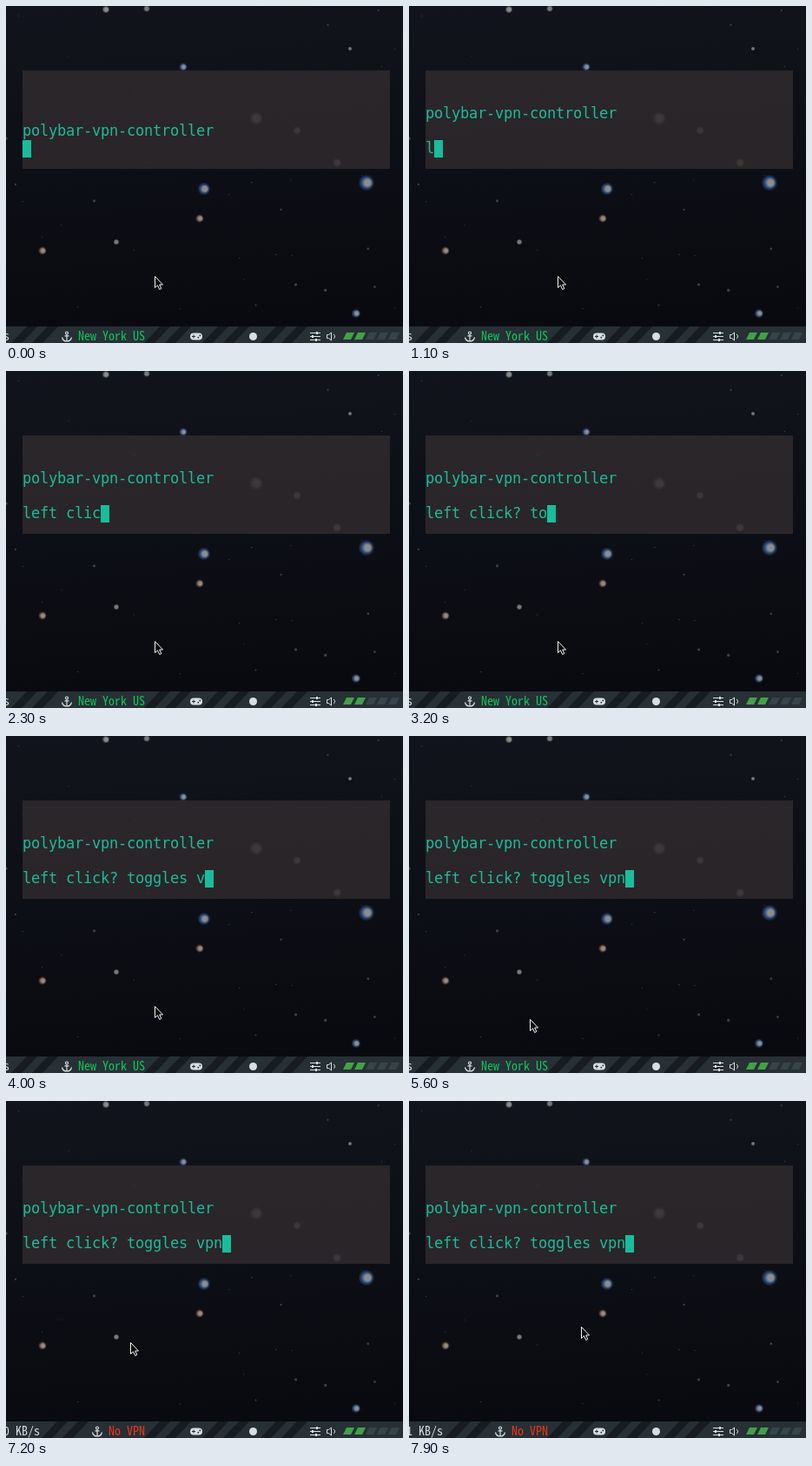
Recreate the animation shown at these times as an HTML page with a canvas. Size 457 by 387 pixels, loop 8 s.

```html
<!DOCTYPE html>
<html lang="en">
<head>
<meta charset="utf-8">
<title>polybar-vpn-controller</title>
<style>
  html, body { margin: 0; width: 100%; height: 100%; overflow: hidden; background: #0c0e14; }
  canvas { display: block; width: 457px; height: 387px; }
</style>
</head>
<body>
<canvas id="stage"></canvas>
<script>
const W = 457, H = 387, LOOP = 8000, TICK = 100;
const TEAL = '#1abc9c', LIGHT = '#d9dee1', BAR = '#263035', GAP = '#161c20';
const CELL = 10, LEFT = 19, BAR_TOP = 368;
const TERM_FONT = '17px "DejaVu Sans Mono", monospace';
const BAR_FONT = '14px "Noto Sans Mono CJK JP", "Noto Sans Mono CJK SC", monospace';

const TITLE = 'polybar-vpn-controller';
const TITLE_UP = 600, TYPE_START = 1100, VPN_OFF = 7000, RATE_UP = 7500;
// One slot per tick; empty slots are pauses.
const KEYS = 'l|e|f|t| ||c|l|i||||c|k||?||| |||to||g|g|le||s ||v|||||p|n'.split('|');

const canvas = document.getElementById('stage');
const dpr = window.devicePixelRatio || 1;
canvas.width = Math.round(W * dpr);
canvas.height = Math.round(H * dpr);
const ctx = canvas.getContext('2d');
ctx.scale(dpr, dpr);
ctx.lineJoin = 'round';

const clamp = v => Math.min(1, Math.max(0, v));
const easeIn = (u, p) => u ** p;
const easeOut = (u, p) => 1 - (1 - u) ** p;
const mix = (a, b, u) => Math.round(a + (b - a) * u);

function seeded(seed) {
  return () => (seed = seed * 16807 % 2147483647) / 2147483647;
}

function rect(x, y, w, h, fill) {
  ctx.fillStyle = fill;
  ctx.fillRect(x, y, w, h);
}

function poly(points, fill) {
  ctx.beginPath();
  points.forEach(([x, y]) => ctx.lineTo(x, y));
  ctx.closePath();
  ctx.fillStyle = fill;
  ctx.fill();
}

function disc(x, y, r, fill) {
  ctx.beginPath();
  ctx.arc(x, y, r, 0, Math.PI * 2);
  ctx.fillStyle = fill;
  ctx.fill();
}

function stroke(width, build) {
  ctx.beginPath();
  build();
  ctx.lineWidth = width;
  ctx.strokeStyle = LIGHT;
  ctx.stroke();
}

function text(str, x, y, font, fill) {
  ctx.font = font;
  ctx.fillStyle = fill;
  ctx.fillText(str, x, y);
}

function glow(x, y, r, color) {
  const g = ctx.createRadialGradient(x, y, 0, x, y, r);
  g.addColorStop(0, color);
  g.addColorStop(0.5, color);
  g.addColorStop(1, color + '00');
  disc(x, y, r, g);
}

// The brightest stars; the rest is random dust.
const stars = {
  '#77797d': [[115, 4, 4.5], [162, 3, 4], [127, 271, 3.5], [396, 49, 2.5],
              [288, 129, 8], [335, 143, 5], [381, 180, 5.5]],
  '#34598f': [[204, 70, 5], [228, 210, 7.5], [415, 203, 9.5], [403, 353, 5.5]],
  '#7d5a45': [[223, 244, 5], [42, 281, 5]]
};

function drawSky() {
  const g = ctx.createLinearGradient(0, 0, 30, H);
  g.addColorStop(0, '#12141d');
  g.addColorStop(0.5, '#0d0f16');
  g.addColorStop(1, '#090a0f');
  rect(0, 0, W, H, g);

  const random = seeded(41);
  for (let i = 0; i < 40; i++) {
    glow(random() * W, random() * H, 0.8 + random() ** 3 * 1.5, '#3c4148');
  }
  for (const [color, group] of Object.entries(stars)) {
    for (const [x, y, r] of group) {
      glow(x, y, r, color);
      if (r > 4) glow(x + r * 0.12, y, r * 0.65, '#8f8d8a');
    }
  }
}

// Each glyph sits in its own terminal cell.
function termText(str, y) {
  [...str].forEach((ch, i) => text(ch, LEFT + i * CELL, y, TERM_FONT, TEAL));
}

function drawTerminal(t) {
  rect(LEFT, 74, 423, 113, 'rgba(47, 42, 44, 0.85)');
  const slots = Math.max(0, (t - TYPE_START) / TICK + 1);
  const typed = KEYS.slice(0, slots).join('');
  termText(TITLE, t < TITLE_UP ? 149 : 129);
  termText(typed, 169);
  rect(LEFT + typed.length * CELL, 154, CELL, 20, TEAL);
}

function slash(x, w, fill) {
  poly([[x + 9, BAR_TOP], [x + 9 + w, BAR_TOP], [x - 9 + w, H], [x - 9, H]], fill);
}

function gap(x) {
  slash(x - 18, 12, GAP);
  slash(x + 6, 12, GAP);
}

function anchorIcon(x) {
  const c = x + 6;
  stroke(1.2, () => {
    ctx.arc(c, 375.5, 1.5, 0, Math.PI * 2);
    ctx.moveTo(c, 377);
    ctx.lineTo(c, 385);
    ctx.moveTo(c - 2.5, 378.8);
    ctx.lineTo(c + 2.5, 378.8);
    ctx.moveTo(c - 5.5, 380.5);
    ctx.quadraticCurveTo(c - 4.5, 385, c, 385);
    ctx.quadraticCurveTo(c + 4.5, 385, c + 5.5, 380.5);
  });
}

function gamepadIcon(x, y) {
  ctx.beginPath();
  ctx.roundRect(x, y, 14, 8, 4);
  ctx.fillStyle = LIGHT;
  ctx.fill();
  rect(x + 2, y + 3.5, 4, 1, BAR);
  rect(x + 3.5, y + 2, 1, 4, BAR);
  disc(x + 9.3, y + 5.2, 0.9, BAR);
  disc(x + 11.3, y + 2.9, 0.9, BAR);
}

function slidersIcon(x, y) {
  [8, 3, 7].forEach((knob, i) => {
    rect(x, y + i * 4, 12, 1, LIGHT);
    rect(x + knob - 1, y + i * 4 - 1, 2, 3, LIGHT);
  });
}

function speakerIcon(x, y) {
  stroke(1, () => {
    ctx.moveTo(x, y - 2);
    ctx.lineTo(x + 2, y - 2);
    ctx.lineTo(x + 5, y - 4.5);
    ctx.lineTo(x + 5, y + 4.5);
    ctx.lineTo(x + 2, y + 2);
    ctx.lineTo(x, y + 2);
    ctx.closePath();
    ctx.moveTo(x + 7.5, y - 2.5);
    ctx.arc(x + 6, y, 3, -1, 1);
  });
}

function drawBar(t) {
  const off = t >= VPN_OFF;
  const label = off ? 'No VPN' : 'New York US';
  const labelX = 160 - label.length * 7;
  const anchorX = labelX - 19;

  rect(0, BAR_TOP, W, H - BAR_TOP, BAR);
  [anchorX - 31, 186, 253, 320].forEach(gap);
  text(`${t >= RATE_UP ? 1 : 0} KB/s`, anchorX - 102, 384, BAR_FONT, LIGHT);
  anchorIcon(anchorX);
  text(label, labelX, 384, BAR_FONT, off ? '#f5341a' : '#0fc85c');
  gamepadIcon(212, 375.5);
  disc(284.5, 379.5, 4.5, LIGHT);
  slidersIcon(350, 375);
  speakerIcon(369.5, 379.5);
  for (let i = 0; i < 5; i++) {
    const x = 388 + i * 13;
    poly([[x + 4, 375], [x + 13, 375], [x + 9, 383], [x, 383]], i < 2 ? '#43a047' : '#37444b');
  }
}

// Down to the label, then away in a curve up and right.
function pointerAt(t) {
  const down = clamp((t - 5200) / 1000);
  const away = clamp((t - 6600) / 1300);
  return away > 0
    ? [mix(121, 198, easeIn(away, 1.6)), mix(375, 259, easeOut(away, 3))]
    : [mix(171, 121, easeOut(down, 2)), mix(310, 375, easeIn(down, 1.6))];
}

function drawPointer(t) {
  const [x, y] = pointerAt(t);
  ctx.save();
  ctx.translate(x + 0.5, y + 0.5);
  poly([[0, 0], [0, 13], [3, 10.3], [5.2, 15], [7.3, 14], [5.2, 9.5], [9, 9.5]], '#08080a');
  ctx.lineWidth = 1;
  ctx.strokeStyle = '#f4f4f4';
  ctx.stroke();
  ctx.restore();
}

const start = performance.now();

function frame() {
  const t = Math.floor((performance.now() - start) % LOOP / TICK) * TICK;
  drawSky();
  drawTerminal(t);
  drawBar(t);
  drawPointer(t);
  requestAnimationFrame(frame);
}
frame();
</script>
</body>
</html>
```
